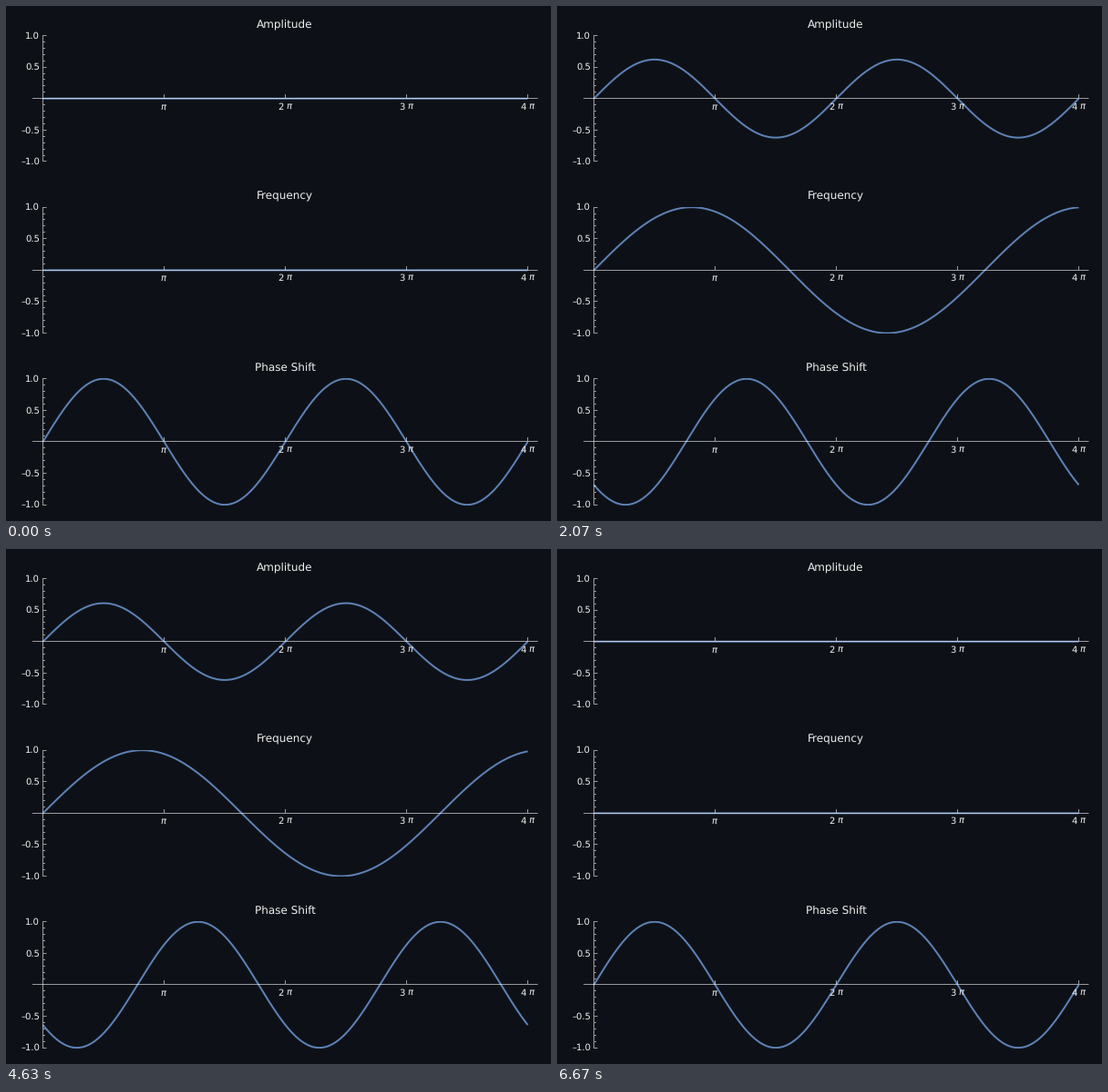
These frames come from a looping animation (598x566 px, 6700 ms). A matplotlib script:

```python
import numpy as np
import matplotlib.pyplot as plt
from matplotlib.animation import FuncAnimation
from matplotlib.collections import LineCollection
from matplotlib.patches import Rectangle

W, H, DPI = 598, 566, 64
TICK_MS, LOOP_MS = 20, 6700
BG, CURVE, INK = "#0d1117", "#5e81b5", "#f0f0f0"
X0, PI_PX = 40.5, 133       # left axis and pixels per pi
Y0, ROW, AMP = 101.75, 188.6, 69.2   # first baseline, panel pitch, unit height

plt.rcParams["font.family"] = "DejaVu Sans"
plt.rcParams["mathtext.fontset"] = "dejavusans"
plt.rcParams["text.hinting"] = "none"


def px(size):
    return size * 72 / DPI


def mid(v):
    """Centre of the pixel holding v, for crisp hairlines."""
    return np.floor(v) + 0.5


fig = plt.figure(figsize=(W / DPI, H / DPI), dpi=DPI, facecolor=BG)
ax = fig.add_axes([0, 0, 1, 1])
ax.set_xlim(0, W)
ax.set_ylim(H, 0)
ax.axis("off")


def label(x, y, text, size=10, ha="center"):
    ax.text(x, y, text, fontsize=px(size), color=INK, ha=ha,
            va="baseline", zorder=4)


def draw_panel(title, y0):
    """Draw axes, ticks and labels; return the empty curve."""
    base = mid(y0)
    top, bottom = np.floor(y0 - AMP), np.floor(y0 + AMP) + 1
    segs = [[(29, base), (583.5, base)], [(X0, top), (X0, bottom)]]
    for k in range(-10, 11):
        if k:
            y = mid(y0 - AMP * k / 10)
            segs.append([(X0 + 0.5, y), (X0 + (4 if k % 5 == 0 else 2.5), y)])
    for n in range(1, 5):
        x = X0 + n * PI_PX
        segs.append([(x, base - 4.5), (x, base - 0.5)])
        label(x, y0 + 11.8, r"$\pi$" if n == 1 else rf"${n}\ \pi$")
    ax.add_collection(LineCollection(
        segs, colors=[(1, 1, 1, 0.58)], linewidths=px(1), capstyle="butt",
        snap=False, zorder=3))

    for v in (1.0, 0.5, -0.5, -1.0):
        sign = "\u2013" if v < 0 else ""
        label(37, y0 - AMP * v + 3.2, f"{sign}{abs(v):.1f}", ha="right")
    label(306, y0 - 78.2, title, 12)

    line, = ax.plot([], [], color=CURVE, lw=px(2), zorder=2, snap=False,
                    solid_capstyle="butt", solid_joinstyle="round")
    line.set_clip_path(Rectangle((38, top), 537, bottom - top,
                                 transform=ax.transData))
    return line


x = np.linspace(0, 4 * np.pi, 500)
xs = X0 + x / np.pi * PI_PX

waves = {
    "Amplitude": lambda a: a * np.sin(x),
    "Frequency": lambda a: np.sin(a * x),
    "Phase Shift": lambda a: np.sin(x + 2 * np.pi * a),
}
baselines = [Y0 + ROW * i for i in range(3)]
lines = [draw_panel(t, y) for t, y in zip(waves, baselines)]


def update(tick):
    # The picture advances about 30 times a second, on a 10 ms grid.
    t = tick * TICK_MS + 10
    step = (3 * t + 10) // 100
    a = 1 - abs(step - 100) / 100
    for line, y0, wave in zip(lines, baselines, waves.values()):
        line.set_data(xs, y0 - AMP * wave(a))
    return lines


anim = FuncAnimation(fig, update, frames=LOOP_MS // TICK_MS, interval=TICK_MS,
                     repeat=True, repeat_delay=0, blit=False)
plt.show()
```
